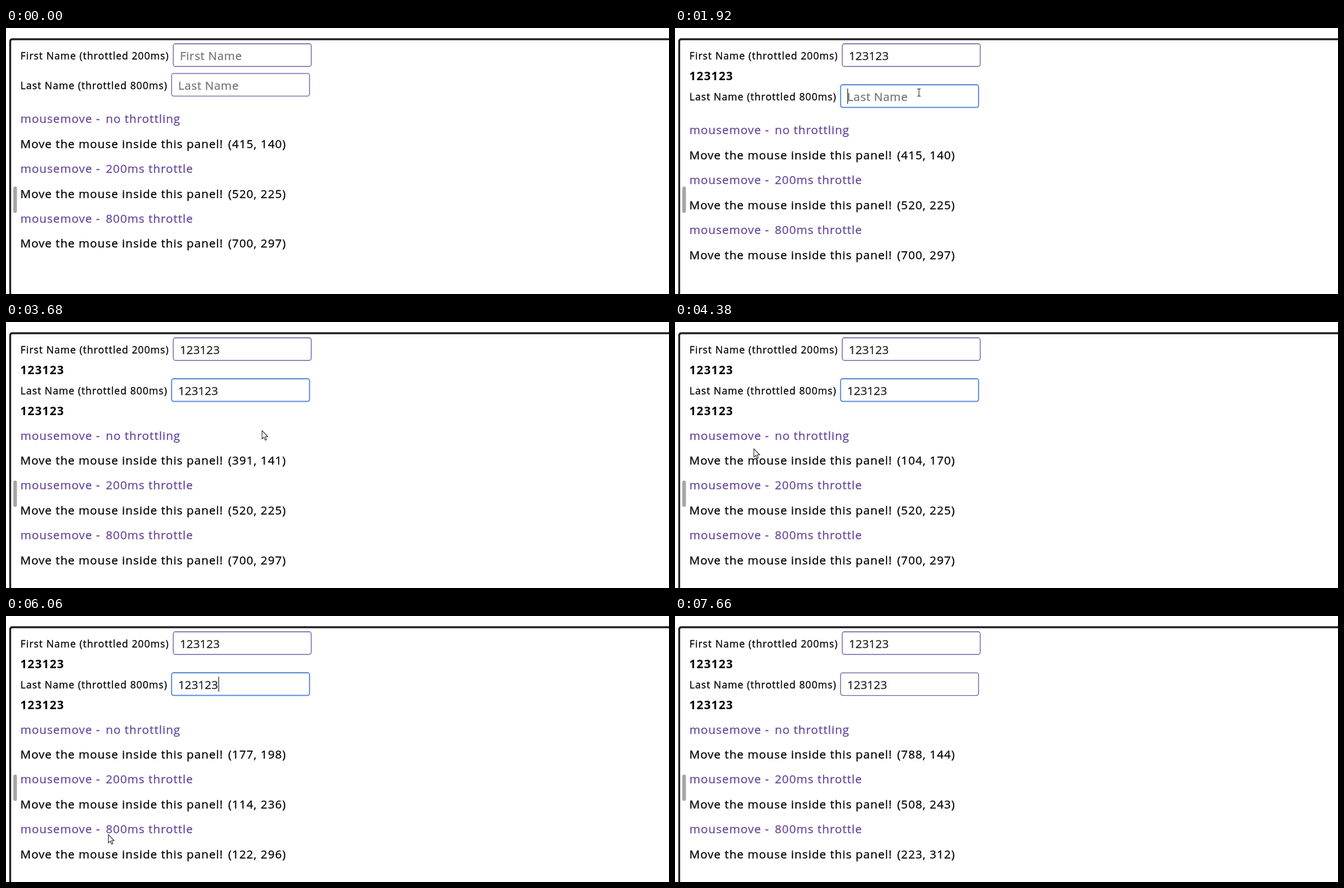
These frames come from a looping animation (1182 by 474 pixels, 7730 ms). An HTML page:

```html
<!DOCTYPE html>
<html lang="en">
<head>
<meta charset="utf-8">
<title>Throttled inputs</title>
<style>
  html, body { margin: 0; width: 100%; height: 100%; overflow: hidden; background: #fff; }
  svg { display: block; width: 1182px; height: 474px; }
  text {
    font: 20.7px "Open Sans", "Noto Sans", sans-serif; letter-spacing: 1px; white-space: pre;
    fill: var(--ink); stroke: var(--ink); stroke-width: .3px; --ink: #000;
  }
  .label { font-size: 17.7px; }
  .heading { --ink: #66489b; }
  .echo { font-weight: 700; letter-spacing: 1.3px; stroke: none; }
  .value { --ink: #222; letter-spacing: 0; }
  .value.empty { --ink: #757575; letter-spacing: .6px; }
  .box { fill: #fff; stroke: #7059a3; stroke-width: 1.4; }
  .box.focus { stroke: #5a8cdb; stroke-width: 2; }
  .shade { stroke: #dedede; }
  .caret { stroke: #111; stroke-width: 1.2; }
</style>
</head>
<body>
<svg viewBox="0 0 1182 474">
  <path d="M7.5 480V24Q7.5 20 11.5 20H1190" fill="none" stroke="#202022" stroke-width="3.4"/>
  <rect x="13" y="282.5" width="6.5" height="47" rx="3.2" fill="#a6a6a6"/>
  <g id="first"></g>
  <g id="lower">
    <g id="last"></g>
    <g id="panels"></g>
  </g>
  <path id="arrow" d="M.5 .5V15.2L3.9 12.2 6.2 17.6 8.6 16.6 6.3 11.3H10.8Z" fill="#fff" stroke="#223" stroke-width="1.1"/>
  <path id="beam" d="M-3 -6.5H-1L0 -5.5 1 -6.5H3M0 -5.5V5.5M-3 6.5H-1L0 5.5 1 6.5H3" fill="none" stroke="#222" stroke-width="1.1"/>
</svg>
<script>
const LOOP = 7730, STEP = 70, DIGIT = 11.9;
const PANELS_FROM = 3470, LEAVE = 7590, SHIFT = 20.2;
const PANEL_TOP = 181, PANEL_HEIGHT = 89;
const $ = id => document.getElementById(id);

// Turning points of the pointer: time, x, y
const path = [
  [70, 800, 48], [420, 443, 61], [1540, 443, 61], [1770, 435, 115], [3470, 435, 115],
  [3680, 456, 193], [4520, 77, 232], [4940, 221, 256], [5010, 226, 278], [5080, 217, 276],
  [5500, 13, 292], [5920, 151, 298], [5990, 160, 364], [6060, 182, 389], [6760, 125, 400],
  [7040, 271, 381], [7250, 585, 305], [7390, 893, 196], [7530, 1100, 2]
];

// Each burst types "123": start time and gap between keys.
const fields = [
  { el: $("first"), name: "First Name", wait: 200, left: 298.2, top: 28, focus: [490, 1850],
    bursts: [[630, 120], [1260, 105]] },
  { el: $("last"), name: "Last Name", wait: 800, left: 295.2, top: 80.9, focus: [1850, 7530],
    bursts: [[2330, 35], [2680, 70]] }
];

const panels = [
  { name: "no throttling", wait: 0, start: [415, 140] },
  { name: "200ms throttle", wait: 200, start: [520, 225] },
  { name: "800ms throttle", wait: 800, start: [700, 297] }
];

function add(parent, tag, attributes, content = "") {
  const el = document.createElementNS("http://www.w3.org/2000/svg", tag);
  for (const key in attributes) el.setAttribute(key, attributes[key]);
  el.textContent = content;
  parent.append(el);
  return el;
}

const addText = (parent, x, y, content, className = "") =>
  add(parent, "text", { x, y, class: className }, content);

function buildField(field) {
  const { el, name, wait, left, top } = field;
  addText(el, 25.8, top + 28.2, `${name} (throttled ${wait}ms)`, "label");
  field.box = add(el, "rect", { class: "box", x: left, y: top, width: 246, height: 40.5, rx: 4 });
  add(el, "path", { class: "shade", d: `M${left + 3} ${top + 1.7}h240` });
  field.value = addText(el, left + 11.8, top + 28.6, "", "value");
  field.caret = add(el, "path", { class: "caret", d: `M${left + 12.6} ${top + 7}v27` });
  field.echo = addText(el, 25.5, top + 64.8, "", "echo");
  field.keys = field.bursts.flatMap(([start, gap]) => [0, 1, 2].map(i => start + i * gap))
    .map((time, i) => [time, "123123".slice(0, i + 1)]);
}

function buildPanel(panel, i) {
  const y = 169.3 + i * 88.8;
  addText($("panels"), 25.8, y, "mousemove -", "heading");
  addText($("panels"), 178, y, panel.name, "heading");
  addText($("panels"), 25.5, y + 44.5, "Move the mouse inside this panel!");
  panel.output = addText($("panels"), 396, y + 44.5, "");
}

const show = (el, visible) => el.setAttribute("visibility", visible ? "visible" : "hidden");
const move = (el, x, y) => el.setAttribute("transform", `translate(${x} ${y})`);

function pointer(t) {
  const next = path.findIndex(([time]) => time > t);
  if (next < 1) return path.at(next).slice(1);
  const [t0, x0, y0] = path[next - 1], [t1, x1, y1] = path[next];
  const k = (t - t0) / (t1 - t0);
  return [x0 + (x1 - x0) * k, y0 + (y1 - y0) * k];
}

// Value shown at t: the first event passes at once, later ones at most once per wait.
function throttled(events, wait, t, value) {
  let last = -Infinity, pending = null;
  const flush = now => {
    if (!pending || now < last + wait) return;
    last = Math.max(pending[0], last + wait);
    value = pending[1];
    pending = null;
  };
  for (const event of events) {
    if (event[0] > t) break;
    flush(event[0]);
    pending = event;
    flush(event[0]);
  }
  flush(t);
  return value;
}

function recordMoves() {
  panels.forEach(panel => panel.moves = []);
  for (let time = PANELS_FROM; time < LEAVE; time += STEP) {
    const [x, y] = pointer(time);
    const panel = panels[Math.floor((y - PANEL_TOP) / PANEL_HEIGHT)];
    if (panel) panel.moves.push([time, [Math.round((x - 26) / 1.1), Math.round((y - 38) / 1.1)]]);
  }
}

const caretOn = t => t < 3300 || Math.floor((t - 3300) / 500) % 2 === 1;

function drawField(field, t) {
  const typed = throttled(field.keys, 0, t, "");
  const echo = throttled(field.keys, field.wait, t, "");
  const focused = t >= field.focus[0] && t < field.focus[1];
  field.value.textContent = typed || field.name;
  field.value.classList.toggle("empty", !typed);
  field.box.classList.toggle("focus", focused);
  field.echo.textContent = echo;
  move(field.caret, typed.length * DIGIT, 0);
  show(field.caret, focused && caretOn(t));
  return echo ? SHIFT : 0;
}

function drawPointer(t) {
  const offset = t < 1920 ? 0 : PANELS_FROM % STEP;
  const [x, y] = pointer(Math.floor((t - offset) / STEP) * STEP + offset);
  const visible = t >= 70 && t < LEAVE;
  const overField = fields.some(({ left, top }, i) =>
    x > left && x < left + 246 && Math.abs(y - top - 20 - i * SHIFT) < 21);
  move($("arrow"), x, y);
  move($("beam"), x, y);
  show($("arrow"), visible && !overField);
  show($("beam"), visible && overField);
}

function draw(t) {
  const [firstShift, lastShift] = fields.map(field => drawField(field, t));
  move($("lower"), 0, firstShift);
  move($("panels"), 0, lastShift);
  for (const { output, moves, wait, start } of panels)
    output.textContent = `(${throttled(moves, wait, t, start).join(", ")})`;
  drawPointer(t);
}

fields.forEach(buildField);
panels.forEach(buildPanel);
recordMoves();

const began = performance.now();
function tick() {
  draw((performance.now() - began) % LOOP);
  requestAnimationFrame(tick);
}
tick();
</script>
</body>
</html>
```
